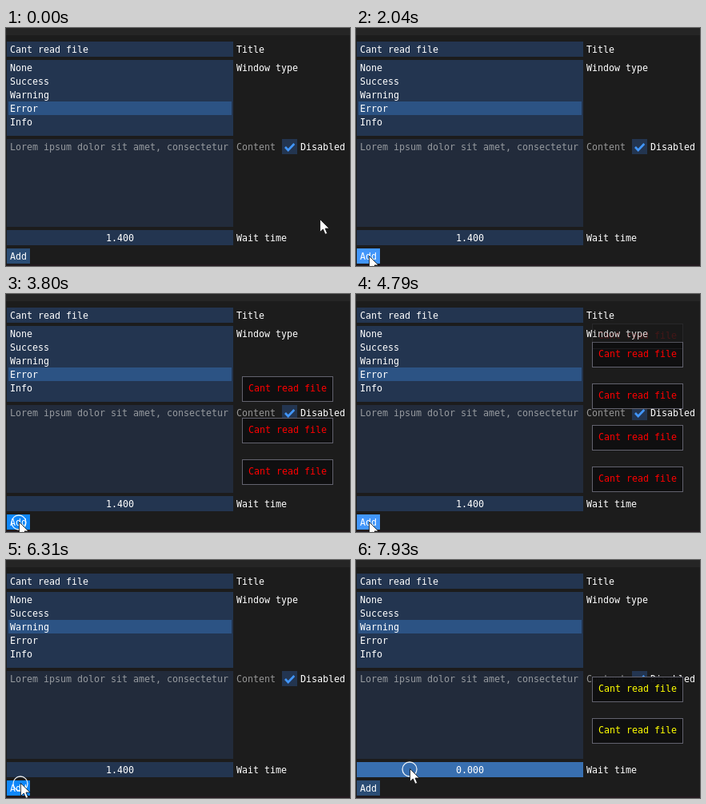
Recreate the animation shown at these times as an HTML page. Size 430x298 px, loop 8 s.

```html
<!DOCTYPE html>
<html lang="en">
<head>
<meta charset="utf-8">
<title>Notification demo</title>
<style>
  html, body { margin: 0; width: 100%; height: 100%; overflow: hidden; background: #1c1c1c; }
  svg { display: block; width: 430px; height: 298px; }
  text { font: 11.63px "DejaVu Sans Mono", "Liberation Mono", monospace; fill: #fff; white-space: pre; }
</style>
</head>
<body>
<svg id="stage" viewBox="0 0 430 298"></svg>
<script>
const LOOP = 8000, STEP = 90;
const LIFE = 1530, FADE = 90, SLIDE = 208, GAP = 52, BASE = 245;
const C = {
  frame: '#233550', frameHot: '#2b4d75', frameOn: '#386fb0', dim: '#222b3b',
  row: '#2c5384', rowHot: '#3c82d8', button: '#2b4d75', hot: '#4296fa', on: '#0f87fa',
};
const KINDS = ['None', 'Success', 'Warning', 'Error', 'Info'];
const PICK = 5820;

// Screen refreshes: [first time, count], one per STEP
const ticks = [
  [0, 2], [360, 1], [510, 5], [1050, 9], [1860, 1], [2040, 4], [2870, 1],
  [3050, 2], [3200, 2], [3470, 4], [3800, 6], [4340, 9], [5140, 1],
  [5230, 9], [6040, 9], [6850, 6], [7480, 1], [7660, 4],
].flatMap(([from, n]) => Array.from({ length: n }, (_, i) => from + i * STEP));

// Pointer: [time, x, y]
const path = [
  [0, 392, 239], [90, 392, 242], [360, 391, 242], [510, 350, 212], [690, 215, 125],
  [870, 150, 88], [1050, 120, 62], [1230, 80, 50], [1410, 40, 100], [1590, 20, 215],
  [1770, 16, 278], [1860, 16, 285], [5140, 16, 285], [5230, 17, 262], [5410, 24, 178],
  [5590, 32, 110], [5770, 35, 86], [5860, 35, 86], [5950, 34, 94], [6130, 23, 200],
  [6220, 18, 266], [6310, 18, 279], [6760, 18, 279], [6940, 28, 276], [7120, 56, 268],
  [7300, 78, 263], [7480, 81, 261], [7660, 81, 261], [7930, 67, 261], [8000, 67, 261],
];

// Toasts: [birth, time the button was held before it]
const toasts = [
  [2214, 90], [2700, 90], [3168, 90], [3494, 90], [3912, 122], [4300, 80], [4560, 80],
  [4775, 80], [6380, 90], [6510, 60], [6640, 60],
];

const rect = (x, y, w, h, fill) => `<rect x="${x}" y="${y}" width="${w}" height="${h}" fill="${fill}"/>`;
const label = (x, y, s, fill = '#fff') => `<text x="${x}" y="${y}" style="fill:${fill}">${s}</text>`;
const clamp = v => Math.max(0, Math.min(1, v));

function pointer(t) {
  const i = Math.max(1, path.findIndex(k => k[0] >= t));
  const [a, b] = [path[i - 1], path[i]];
  const p = (t - a[0]) / (b[0] - a[0]);
  return [1, 2].map(n => Math.round(a[n] + (b[n] - a[n]) * p));
}

function toast([born], i, t) {
  const age = t - born;
  if (age <= 0 || age >= LIFE) return '';
  // Older toasts below hold their slot, then release it linearly
  const below = toasts.slice(0, i).reduce((sum, [b]) => {
    const end = b + LIFE;
    return end <= born ? sum : sum + 1 - clamp((t - end) / SLIDE);
  }, 0);
  const y = Math.round(BASE - GAP * below);
  const alpha = Math.min(clamp(age / FADE), clamp((LIFE - age) / FADE));
  const ink = born < PICK ? '#f00' : '#ff0';
  return `<g opacity="${alpha}">
    <rect x="295.5" y="${y + .5}" width="113" height="31" fill="#0f0f10" fill-opacity=".96" stroke="#62626e"/>
    ${label(303, y + 19, 'Cant read file', ink)}</g>`;
}

function cursor(x, y, down) {
  const ring = down ? `<circle cx="${x}" cy="${y + 1}" r="9" fill="none" stroke="#fff" stroke-width="1.3" opacity=".9"/>` : '';
  return ring + `<path transform="translate(${x} ${y})" d="M.5 .5V16.5L4.3 13 7 19.3 9.6 18.2 7 12H12Z"
    fill="#fff" stroke="#111" stroke-width=".8"/>`;
}

function draw(t) {
  const [x, y] = pointer(t);
  const over = (l, top, r, bottom) => x >= l && x < r && y >= top && y < bottom;
  const adding = toasts.some(([b, hold]) => t >= b - hold && t < b);
  const picking = t >= 5770 && t < 5850;
  const dragging = t >= 7480;
  const selected = t < PICK ? 3 : 2;
  const value = t < 7660 ? 1.4 : Math.max(0, (x - 67) * .1);

  const rows = KINDS.map((name, i) => {
    const top = 41 + 17 * i;
    const hot = over(3, top, 282, top + 17);
    const fill = hot ? (picking ? C.hot : C.rowHot) : i === selected ? C.row : '';
    return (fill ? rect(3, top, 279, 17, fill) : '') + label(5, top + 13, name);
  }).join('');

  const wait = dragging ? C.frameOn : over(1, 253, 284, 272) ? C.frameHot : C.frame;
  const add = adding ? C.on : over(1, 276, 30, 296) ? C.hot : C.button;
  const title = over(1, 17, 284, 36) ? C.frameHot : C.frame;

  return rect(0, 0, 430, 298, '#1c1c1c') + rect(0, 0, 430, 9, '#252525')
    + rect(0, 296, 430, 2, '#221a1f')
    + rect(1, 17, 283, 19, title) + label(5, 31, 'Cant read file') + label(288, 31, 'Title')
    + rect(1, 40, 283, 95, C.frame) + rows + label(288, 54, 'Window type')
    + rect(1, 139, 283, 110, C.dim)
    + label(5, 153, 'Lorem ipsum dolor sit amet, consectetur', '#969a9f')
    + label(288, 153, 'Content', '#969696')
    + rect(345, 139, 19, 19, C.frame)
    + `<path d="M349 149L352.7 153 360.3 145" fill="none" stroke="${C.hot}" stroke-width="2.6"/>`
    + label(368, 153, 'Disabled')
    + rect(1, 253, 283, 19, wait) + label(125, 267, value.toFixed(3)) + label(288, 267, 'Wait time')
    + rect(1, 276, 29, 19, add) + label(5, 290, 'Add')
    + toasts.map((n, i) => toast(n, i, t)).join('')
    + cursor(x, y, adding || picking || dragging);
}

const stage = document.getElementById('stage');
const start = performance.now();
let shown = -1;

function tick(now) {
  const t = Math.max(0, now - start) % LOOP;
  const at = ticks.filter(k => k <= t).pop();
  if (at !== shown) stage.innerHTML = draw(shown = at);
  requestAnimationFrame(tick);
}
tick(start);
</script>
</body>
</html>
```
